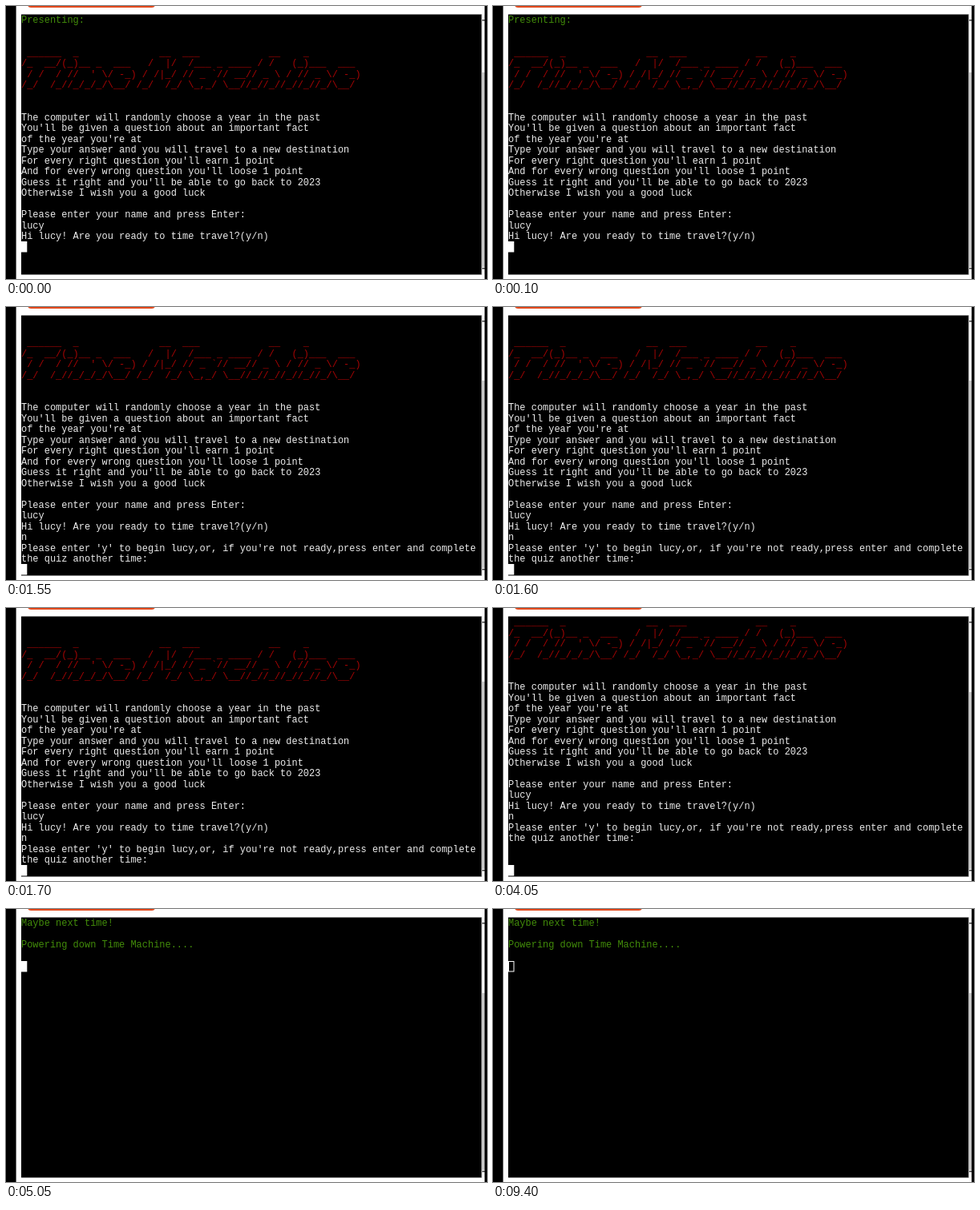
Recreate the animation shown at these times as an HTML page with a canvas. Size 600x341 px, loop 9450 ms.

```html
<!DOCTYPE html>
<html lang="en">
<head>
<meta charset="utf-8">
<title>Time Machine terminal</title>
<style>
  html, body { margin: 0; width: 100%; height: 100%; overflow: hidden; background: #fff; }
  canvas { display: block; width: 600px; height: 341px; }
</style>
</head>
<body>
<canvas id="stage"></canvas>
<script>
const W = 600, H = 341, LOOP = 9450;
const LEFT = 19, TOP = 11, CELL = 7.18, ROW = 13.5;
const WHITE = '#ececec', GREEN = '#428c0a', RED = '#a60404';

const canvas = document.getElementById('stage');
const ctx = canvas.getContext('2d');
const scale = window.devicePixelRatio || 1;
canvas.width = Math.round(W * scale);
canvas.height = Math.round(H * scale);
ctx.scale(scale, scale);

const paint = (color, lines) => lines.map(text => ({ text, color }));

const banner = [
  ' ______  _' + ' '.repeat(14) + '__  ___' + ' '.repeat(12) + '__    _',
  '/_  __/(_)__ _  ___   /  |/  /___ _ ____ / /   (_)___  ___',
  " / /  / //  ' \\/ -_) / /|_/ // _ `// __// _ \\ / // _ \\/ -_)",
  '/_/  /_//_/_/_/\\__/ /_/  /_/ \\_,_/ \\__//_//_//_//_//_/\\__/'
];

const intro = [
  ...paint(GREEN, ['Presenting:', '', '']),
  ...paint(RED, banner),
  ...paint(WHITE, [
    '', '',
    'The computer will randomly choose a year in the past',
    "You'll be given a question about an important fact",
    "of the year you're at",
    'Type your answer and you will travel to a new destination',
    "For every right question you'll earn 1 point",
    "And for every wrong question you'll loose 1 point",
    "Guess it right and you'll be able to go back to 2023",
    'Otherwise I wish you a good luck',
    '',
    'Please enter your name and press Enter:',
    'lucy',
    'Hi lucy! Are you ready to time travel?(y/n)'
  ])
];

const typed = [...intro, ...paint(WHITE, ['n'])];
const refused = [
  ...typed,
  ...paint(WHITE, [
    "Please enter 'y' to begin lucy,or, if you're not ready,press enter and complete",
    'the quiz another time:'
  ])
];
const goodbye = paint(GREEN, ['Maybe next time!']);
const shutdown = paint(GREEN, ['Maybe next time!', '', 'Powering down Time Machine....']);

// cursor is [column, row]; thumb is the top edge of the scrollbar handle
const scenes = [
  { at: 0, lines: intro, scroll: 0, cursor: [0, 21], thumb: 83 },
  { at: 850, lines: typed, scroll: 0, cursor: [1, 21], thumb: 83 },
  { at: 1550, lines: refused, scroll: 1, cursor: [0, 23], thumb: 92 },
  { at: 4050, lines: refused, scroll: 3, cursor: [0, 23], thumb: 105 },
  { at: 4100, lines: goodbye, scroll: 0, cursor: [0, 2], thumb: 105 },
  { at: 5050, lines: shutdown, scroll: 0, cursor: [0, 4], thumb: 105 },
  { at: 9400, lines: shutdown, scroll: 0, cursor: [0, 4], thumb: 105, blurred: true }
];

function rect(color, x, y, w, h) {
  ctx.fillStyle = color;
  ctx.fillRect(x, y, w, h);
}

function drawPage(thumb) {
  rect('#fff', 0, 0, W, H);
  rect('#000', 0, 0, 12.6, H);
  rect('#000', 597, 0, 3, H);
  ctx.fillStyle = '#e2491c';
  ctx.beginPath();
  ctx.roundRect(27, -12, 159, 14, 4);
  ctx.fill();
  rect('#000', LEFT, TOP - 0.5, 574.5, 325);
  rect('#f4f4f4', 593.5, TOP, 3.5, 324);
  rect('#c4c4c4', 594, thumb, 3, 326 - thumb);
  rect('#444', 594, 17, 3, 1.5);
  rect('#444', 594, 327, 3, 1.5);
}

function drawLine({ text, color }, row) {
  ctx.fillStyle = color;
  [...text].forEach((ch, col) => {
    if (ch !== ' ') ctx.fillText(ch, LEFT + col * CELL, TOP + row * ROW + 10);
  });
}

function drawCursor([col, row], blurred) {
  const x = Math.round(LEFT + col * CELL);
  const y = Math.round(TOP + row * ROW - 0.5);
  if (blurred) {
    ctx.strokeStyle = '#fff';
    ctx.lineWidth = 1;
    ctx.strokeRect(x + 0.5, y + 0.5, 6.5, 12.5);
  } else {
    rect('#fff', x, y, 7.3, 13.5);
  }
}

function render(time) {
  const scene = scenes.findLast(s => s.at <= time);
  drawPage(scene.thumb);
  ctx.font = '11.97px "Courier New", "Liberation Mono", monospace';
  ctx.textBaseline = 'alphabetic';
  scene.lines.slice(scene.scroll).forEach(drawLine);
  drawCursor(scene.cursor, scene.blurred);
}

const start = performance.now();
function tick() {
  render((performance.now() - start) % LOOP);
  requestAnimationFrame(tick);
}
tick();
</script>
</body>
</html>
```
